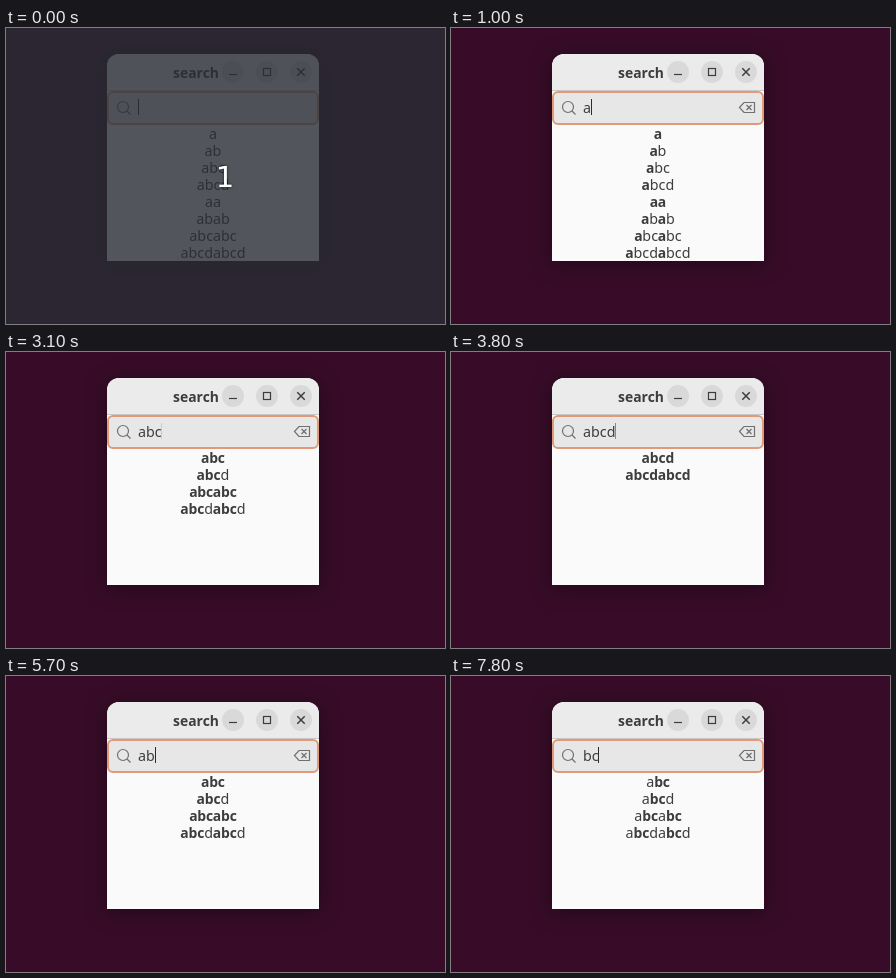
Write an HTML page with a canvas that moves like this. It is 439x296 px and loops after 8000 ms.

```html
<!DOCTYPE html>
<html lang="en">
<head>
<meta charset="utf-8">
<title>search</title>
<style>
  html, body { margin: 0; width: 100%; height: 100%; overflow: hidden; background: #380c28; }
  canvas { display: block; }
</style>
</head>
<body>
<canvas id="stage" width="439" height="296"></canvas>
<script>
const ctx = document.getElementById('stage').getContext('2d');
const LOOP = 8000, STEP = 100;
const FAMILY = '"Noto Sans", "Open Sans", sans-serif';
const REGULAR = `14.3px ${FAMILY}`;
const BOLD = `bold 13.9px ${FAMILY}`;
const INK = '#3d3d3d';
const ITEMS = ['a', 'ab', 'abc', 'abcd', 'aa', 'abab', 'abcabc', 'abcdabcd'];

// [start time, value]
const TYPED = [[0, ''], [500, 'a'], [1400, 'ab'], [2600, 'abc'], [3600, 'abcd'], [5100, 'abc'],
  [5700, 'ab'], [5800, 'a'], [6000, ''], [6400, 'b'], [6500, 'bc']];
const QUERY = [[0, ''], [700, 'a'], [1600, 'ab'], [2800, 'abc'], [3800, 'abcd'], [5200, 'abc'],
  [5800, 'ab'], [6000, ''], [6700, 'bc']];

const valueAt = (track, t) => track.filter(([start]) => start <= t).pop()[1];

// The cursor blinks every 1200 ms, and stays lit while keys are held.
function cursorAlpha(t) {
  if (t < 100 || (t >= 5100 && t < 6900)) return 1;
  const phase = (t - (t < 5100 ? 100 : 6900)) % 1200;
  const fade = k => (1 - Math.cos(Math.PI * Math.min(1, k / 400))) / 2;
  return phase < 600 ? 1 - fade(phase + 100) : fade(phase - 500);
}

function box(x, y, w, h, r) {
  ctx.beginPath();
  ctx.roundRect(x, y, w, h, r);
}

function line(points, closed) {
  ctx.beginPath();
  points.forEach(([x, y]) => ctx.lineTo(x, y));
  if (closed) ctx.closePath();
  ctx.stroke();
}

function cross(x, y, r) {
  line([[x - r, y - r], [x + r, y + r]]);
  line([[x - r, y + r], [x + r, y - r]]);
}

function label(text, x, y, font, color, align = 'left') {
  ctx.font = font;
  ctx.fillStyle = color;
  ctx.textAlign = align;
  ctx.fillText(text, x, y);
}

function width(text) {
  ctx.font = REGULAR;
  return ctx.measureText(text).width;
}

function drawFrame() {
  ctx.fillStyle = '#380c28';
  ctx.fillRect(0, 0, 439, 296);

  ctx.save();
  ctx.shadowColor = 'rgba(0,0,0,.42)';
  ctx.shadowBlur = 22;
  ctx.shadowOffsetY = 3;
  ctx.fillStyle = '#fafafa';
  box(101, 26, 212, 207, [12, 12, 0, 0]);
  ctx.fill();
  ctx.restore();

  ctx.fillStyle = '#ebebeb';
  box(101, 26, 212, 37, [12, 12, 0, 0]);
  ctx.fill();
  ctx.fillStyle = '#c9c8c7';
  ctx.fillRect(101, 62, 212, 1);

  label('search', 190, 50, BOLD, INK, 'center');

  ctx.fillStyle = '#d9d9d9';
  for (const x of [227, 261, 295]) {
    ctx.beginPath();
    ctx.arc(x, 44, 11, 0, 7);
    ctx.fill();
  }
  ctx.strokeStyle = INK;
  ctx.lineWidth = 1.2;
  line([[223, 46.5], [231, 46.5]]);
  ctx.strokeRect(257.5, 40.5, 7, 7);
  ctx.lineWidth = 1.5;
  cross(295, 44, 3.7);
}

function drawEntry(text, alpha) {
  ctx.fillStyle = '#e7e7e7';
  ctx.strokeStyle = '#e19a79';
  ctx.lineWidth = 2;
  box(102, 64, 210, 32, 5);
  ctx.fill();
  ctx.stroke();

  ctx.strokeStyle = '#707070';
  ctx.lineWidth = 1.2;
  ctx.beginPath();
  ctx.arc(117, 79, 5.5, 0, 7);
  ctx.stroke();
  line([[121, 83], [124.5, 86.5]]);

  if (text) {
    line([[288.5, 79.5], [293, 74.5], [303.5, 74.5], [303.5, 84.5], [293, 84.5]], true);
    cross(298, 79.5, 2.5);
    label(text, 132, 85, REGULAR, INK);
  }
  const x = 132 + Math.floor(width(text) + 0.2);
  ctx.globalAlpha = alpha;
  ctx.fillStyle = '#2c2c2c';
  ctx.fillRect(x, 71, 1, 16);
  ctx.globalAlpha = 1;
}

// Characters keep their regular advance, so highlights do not move the row.
function drawRow(item, query, y) {
  let x = 207 - width(item) / 2;
  const parts = query ? item.split(new RegExp(`(${query})`)) : [item];
  for (const part of parts) {
    for (const ch of part) {
      const w = width(ch);
      label(ch, x + w / 2, y, query && part === query ? BOLD : REGULAR, INK, 'center');
      x += w;
    }
  }
}

function drawCountdown() {
  ctx.fillStyle = 'rgba(40,45,53,.8)';
  ctx.fillRect(0, 0, 439, 296);
  ctx.save();
  ctx.shadowColor = 'rgba(0,0,0,.7)';
  ctx.shadowBlur = 3;
  label('1', 219, 159, '29px "DejaVu Sans", sans-serif', '#fff', 'center');
  ctx.restore();
}

function render(now) {
  const t = Math.floor((now % LOOP) / STEP) * STEP;
  const query = valueAt(QUERY, t);
  drawFrame();
  drawEntry(valueAt(TYPED, t), cursorAlpha(t));
  ITEMS.filter(item => item.includes(query))
    .forEach((item, i) => drawRow(item, query, 111 + 17 * i));
  if (t < 100) drawCountdown();
}

let start;
function tick(now) {
  start ??= now;
  render(Math.max(0, now - start));
  requestAnimationFrame(tick);
}
render(0);
requestAnimationFrame(tick);
</script>
</body>
</html>
```
